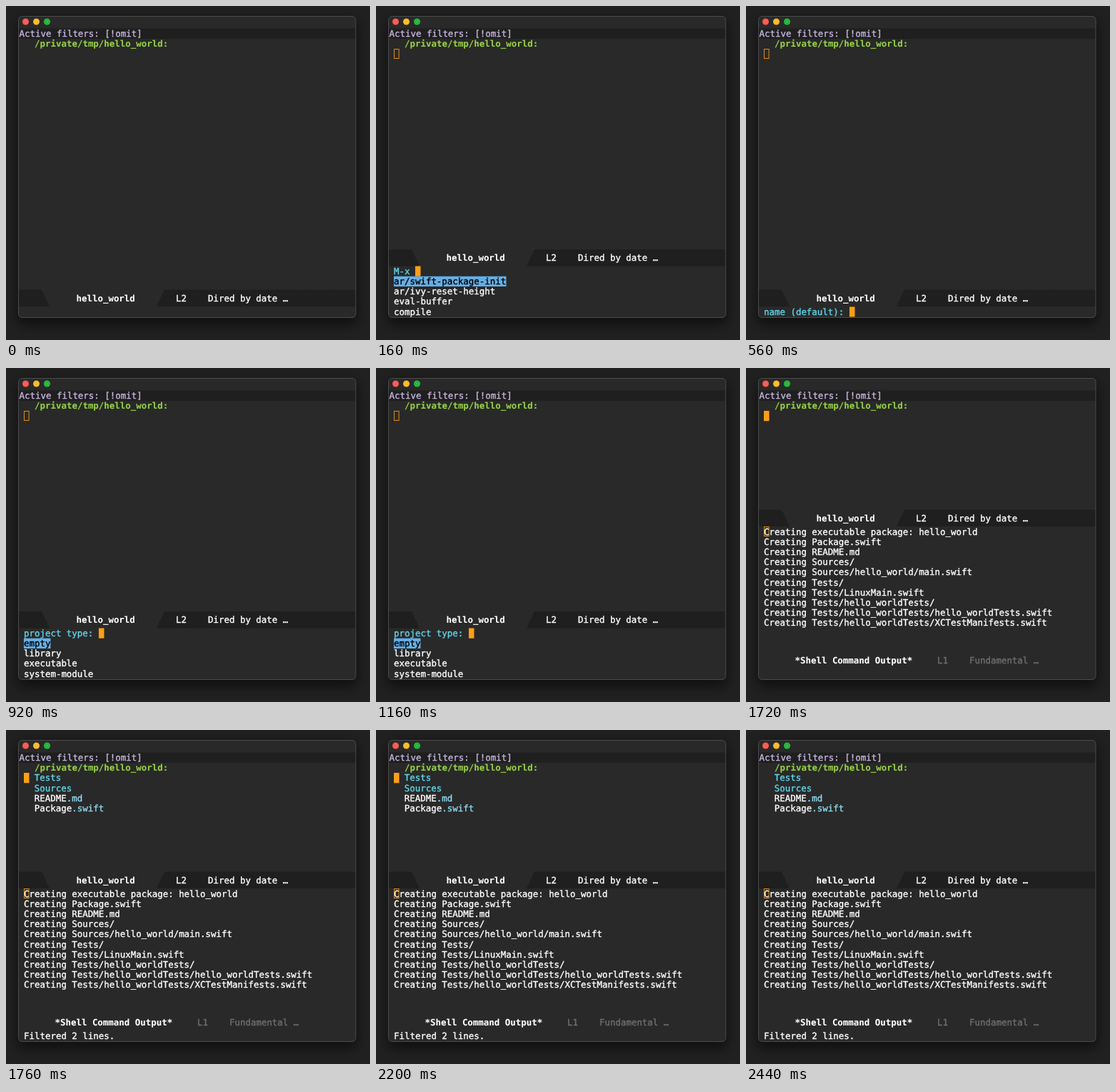
These frames come from a looping animation (510 by 468 pixels, 2520 ms). An HTML page:

```html
<!DOCTYPE html>
<html lang="en">
<head>
<meta charset="utf-8">
<style>
html, body { margin: 0; width: 100%; height: 100%; overflow: hidden; background: #212121; }
#window {
  position: absolute; left: 17.5px; top: 14px; width: 472.5px; height: 422.5px;
  border-radius: 5px; background: #292929; box-shadow: 0 7px 18px 2px rgba(0, 0, 0, .55);
}
svg { position: absolute; left: 0; top: 0; display: block; }
/* The tiny turn keeps baselines at fractional heights. */
#screen { transform: rotate(.005deg); }
text {
  font: 12.457px "DejaVu Sans Mono", "Liberation Mono", monospace;
  white-space: pre; text-rendering: geometricPrecision; stroke-width: .35px;
}
.bold { font-weight: bold; stroke-width: .1px; }
</style>
</head>
<body>
<div id="window"></div>
<svg width="510" height="468" viewBox="0 0 510 468">
  <rect x="18" y="31.5" width="472" height="14.5" fill="#1f1f1f"/>
  <g id="screen"></g>
  <rect x="17.5" y="14.5" width="472.5" height="422" rx="5" fill="none" stroke="#4c4c4c"/>
  <circle cx="27.5" cy="22" r="4.5" fill="#ff5c54"/>
  <circle cx="42.5" cy="22" r="4.5" fill="#fdbc2d"/>
  <circle cx="57.5" cy="22" r="4.5" fill="#28c440"/>
  <circle cx="57.5" cy="22" r="2.6" fill="none" stroke="#167f2c" stroke-dasharray="1 1"/>
</svg>
<script>
const CHAR = 7.5, LINE = 14.2, LEFT = 25, LOOP = 2520;
const BUFFER = 31.7, POINT = BUFFER + 2 * LINE, OUTPUT = 222.4, MINI = 364.6, ECHO = MINI + 4 * LINE;
const ORANGE = '#ff9f15', CYAN = '#60d6ea', PALE = '#8edcf0', WHITE = '#fff', GREY = '#707070';
const screen = document.getElementById('screen');

const text = (x, top, str, fill = WHITE, cls = '') =>
  `<text x="${x}" y="${top + 11.2}" fill="${fill}" stroke="${fill}" class="${cls}">${str}</text>`;
const block = (x, top, chars, fill) =>
  `<rect x="${x}" y="${top}" width="${chars * CHAR}" height="${LINE}" fill="${fill}"/>`;
const cursor = (top, x = LEFT) => block(x, top, 1, ORANGE);
const hollow = top =>
  `<rect x="${LEFT + .5}" y="${Math.round(top) + .5}" width="6.6" height="13" fill="none" stroke="${ORANGE}" stroke-opacity=".85"/>`;
const lines = (top, list) => list.map((s, i) => text(LEFT, top + i * LINE, s)).join('');

const header = text(18.5, BUFFER, 'Active filters: [!omit]', '#c6b6dd') +
  text(40, BUFFER + LINE, '/private/tmp/hello_world:', '#96d146', 'bold');

function modeline(top) {
  const b = top + 23.4, label = top + 5.1;
  return `<path d="M18 ${top}H50L61 ${b}H18ZM222 ${top}H490V${b}H211Z" fill="#1f1f1f"/>` +
    text(98.5, label, 'hello_world', WHITE, 'bold') +
    text(238, label, 'L2') + text(283, label, 'Dired by date …');
}

function prompt(top, label, input, caret) {
  const x = LEFT + label.length * CHAR;
  return text(LEFT, top, label, CYAN) + text(x, top, input) +
    (caret ? cursor(top, x + input.length * CHAR) : '');
}

// Minibuffer completion: the first choice is selected, its matched prefix marked.
function picker(label, choices, input = '', caret = true) {
  const [first, ...rest] = choices, n = input.length, top = MINI + LINE;
  return modeline(341) + hollow(POINT) + prompt(MINI, label, input, caret) +
    block(LEFT, top, first.length, '#65aee6') + block(LEFT, top, n, '#7c8c9e') +
    text(LEFT, top, first.slice(0, n), '#000', 'bold') +
    text(LEFT + n * CHAR, top, first.slice(n), '#000') + lines(top + LINE, rest);
}

const commands = caret => picker('M-x ',
  ['ar/swift-package-init', 'ar/ivy-reset-height', 'eval-buffer', 'compile'], '', caret);

const types = ['empty', 'library', 'executable', 'system-module'];
const project = (input, caret = true) =>
  picker('project type: ', types.filter(t => t.includes(input)), input, caret);

const idle = caret => modeline(397.6) + (caret ? cursor(POINT) : '');
const naming = caret => modeline(397.6) + hollow(POINT) +
  prompt(ECHO, 'name (default): ', '', caret);

const created = ['executable package: hello_world', 'Package.swift', 'README.md', 'Sources/',
  'Sources/hello_world/main.swift', 'Tests/', 'Tests/LinuxMain.swift', 'Tests/hello_worldTests/',
  'Tests/hello_worldTests/hello_worldTests.swift', 'Tests/hello_worldTests/XCTestManifests.swift'];
const output = modeline(198.5) + hollow(OUTPUT) + lines(OUTPUT, created.map(s => 'Creating ' + s)) +
  text(68.5, 402.5, '*Shell Command Output*', WHITE, 'bold') +
  text(268, 402.5, 'L1', GREY) + text(313, 402.5, 'Fundamental …', GREY);

const files = [['Tests', '', CYAN], ['Sources', '', CYAN], ['README', '.md', WHITE], ['Package', '.swift', WHITE]];
const listing = files.map(([name, ext, fill], i) => {
  const top = POINT + i * LINE;
  return text(39.8, top, name, fill) + text(39.8 + name.length * CHAR, top, ext, PALE);
}).join('');
const done = caret => output + listing + text(LEFT, ECHO, 'Filtered 2 lines.') +
  (caret ? cursor(POINT) : '');

const steps = [
  [0, idle(false)], [80, idle(true)],
  [160, commands(true)], [280, commands(false)], [400, commands(true)],
  [560, naming(true)], [800, naming(false)],
  [920, project('')], [1080, project('', false)], [1160, project('')],
  [1320, project('e')], [1400, project('ex')], [1440, project('exe')],
  [1600, idle(true)], [1680, output + cursor(POINT)],
  [1760, done(true)], [1960, done(false)], [2200, done(true)], [2440, done(false)],
];

const start = performance.now();
let shown;
function draw() {
  const t = (performance.now() - start) % LOOP;
  const step = steps.findLast(([at]) => at <= t);
  if (step !== shown) {
    shown = step;
    screen.innerHTML = header + step[1];
  }
  requestAnimationFrame(draw);
}
draw();
</script>
</body>
</html>
```
